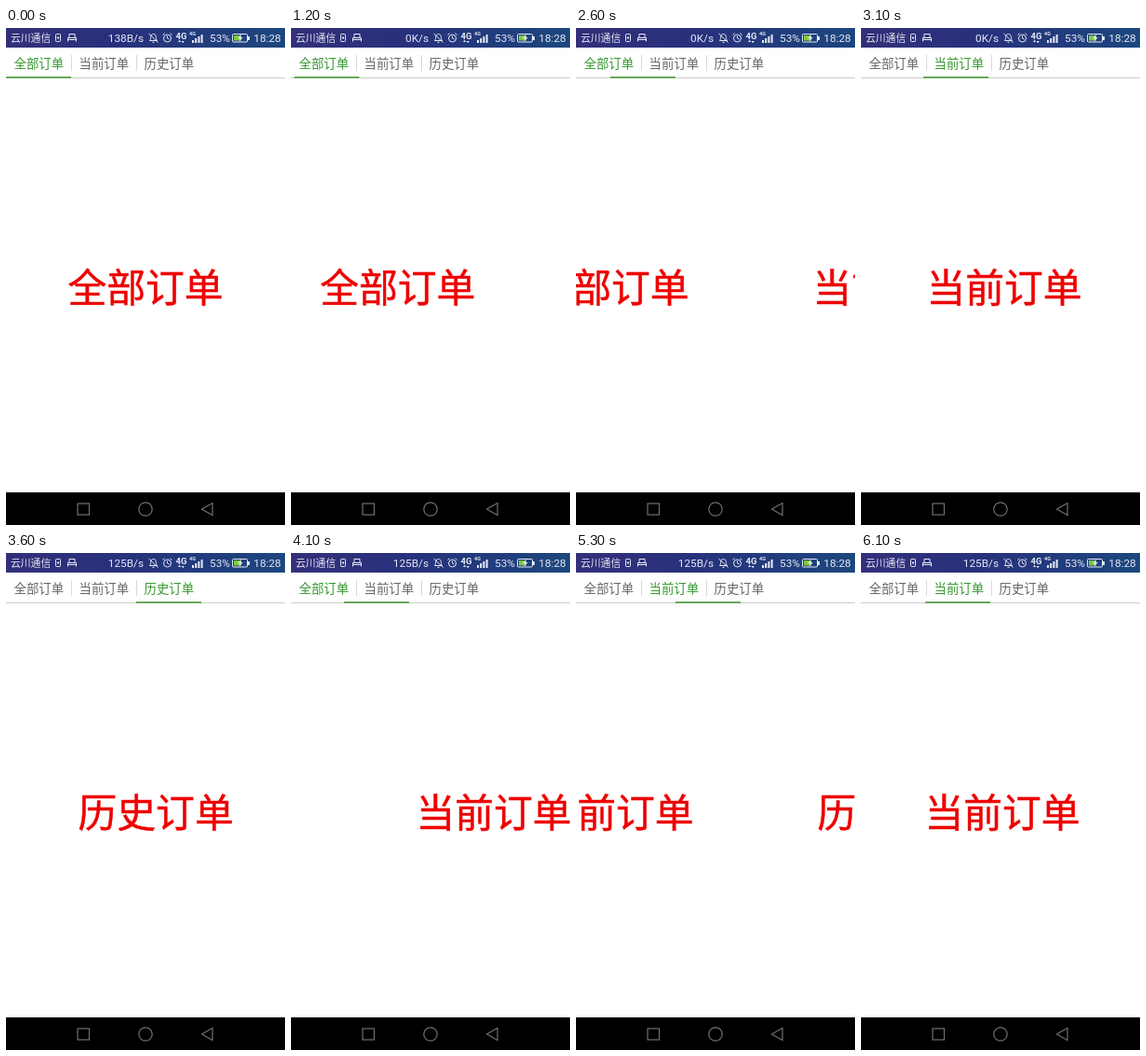
An HTML page for the animation above (6200 ms loop, 300x533 px).

```html
<!DOCTYPE html>
<html lang="zh-CN">
<head>
<meta charset="utf-8">
<title>订单</title>
<style>
  html, body { margin: 0; width: 100%; height: 100%; overflow: hidden; background: #fff; }
  svg { display: block; width: 100%; height: 100%; }
  text { font-family: "Noto Sans CJK SC", "Noto Sans CJK", sans-serif; }
  .status { fill: #e6e8f2; font-size: 11.8px; }
  .status text { font-family: Roboto, sans-serif; }
  .status .carrier { font: 10.8px "Noto Sans CJK SC", "Noto Sans CJK", sans-serif; }
  .status .net { font-size: 9.5px; font-weight: 700; }
  .status .net2 { font-size: 5.5px; font-weight: 700; }
  .line { fill: none; stroke: #e6e8f2; stroke-width: 1; }
  .tabs text { font-size: 13.4px; fill: #666; text-anchor: middle; }
  .tabs .on { fill: #35982f; }
  .pages text { font-size: 41.8px; fill: #ee0000; stroke: #ee0000; stroke-width: .5; text-anchor: middle; }
  .nav { fill: none; stroke: #707070; stroke-width: 1.2; }
</style>
</head>
<body>
<svg viewBox="0 0 300 533" preserveAspectRatio="none">
  <defs>
    <linearGradient id="bar">
      <stop offset="0" stop-color="#33307a"/>
      <stop offset=".4" stop-color="#28307c"/>
      <stop offset="1" stop-color="#1c477e"/>
    </linearGradient>
  </defs>
  <rect width="300" height="533" fill="#fff"/>

  <g class="pages" id="pages">
    <text x="150" y="294">全部订单</text>
    <text x="450" y="294">当前订单</text>
    <text x="750" y="294">历史订单</text>
  </g>

  <g class="tabs" id="tabs">
    <text x="35.3" y="43">全部订单</text>
    <text x="105.3" y="43">当前订单</text>
    <text x="175.3" y="43">历史订单</text>
  </g>
  <path d="M70.5 29V46M140.5 29V46" stroke="#d8d8d8"/>
  <path d="M0 53.5H300" stroke="#ccc"/>
  <rect id="mark" y="52" width="70" height="2" fill="#68a858"/>

  <rect width="300" height="21" fill="url(#bar)"/>
  <g class="status">
    <text class="carrier" x="5" y="15">云川通信</text>
    <rect class="line" x="53.5" y="6.5" width="5" height="8" rx=".8"/>
    <path d="M55 9.5h2v2h-2z"/>
    <path class="line" d="M68 10V6.5h6V10M66.5 14.5v-4h9v4M66.5 12.5h9"/>
    <text id="speed" x="148" y="15" text-anchor="end"></text>
    <path class="line" d="M154.5 13.5c2-2 0-7 4-7s2 5 4 7zM157.5 15.3h2M153.5 6l10 9.5"/>
    <circle class="line" cx="173.5" cy="11" r="4"/>
    <path class="line" d="M173.5 8.5V11l2 1M168.5 7.5l2-2M178.5 7.5l-2-2"/>
    <text class="net" x="182.5" y="11.5">4G</text>
    <path d="M185 15l1.6-2.2L188.2 15zM188.6 14l1.6 2.2L191.8 14z"/>
    <text class="net2" x="197" y="8">4G</text>
    <path d="M200 13h2v3h-2zM203.2 11h2v5h-2zM206.4 9h2v7h-2zM209.6 7h2v9h-2z"/>
    <text x="219" y="15">53%</text>
    <rect class="line" x="243.5" y="6.5" width="16" height="8.5" rx="1"/>
    <path d="M260 9h2v4h-2z"/>
    <path d="M245 8h8v5.5h-8z" fill="#7cc83c"/>
    <path d="M253 6.8l-4 4.4h2.6l-1.2 3.5 4.4-4.8h-2.6z"/>
    <text x="266.3" y="15">18:28</text>
  </g>

  <rect y="498" width="300" height="35" fill="#000"/>
  <g class="nav">
    <rect x="77" y="510" width="12.5" height="12"/>
    <circle cx="150" cy="516" r="7.2"/>
    <path d="M210.5 516L222 509.5V522.5Z"/>
  </g>
</svg>
<script>
const LOOP = 6200, STEP = 100, PAGE = 300, TAB = 70, LAG = 30;

// Swipe path: [time in ms, scroll in px]
const path = [
  [0, 0], [1120, 0], [1350, 170], [1560, 300], [1660, 345], [1700, 346], [1980, 600], [2060, 600],
  [2300, 315], [2430, 298], [2570, 158], [2600, 112], [2720, 0], [2790, 0], [3000, 240], [3070, 287],
  [3100, 296], [3180, 310], [3450, 600], [3570, 600], [3820, 310], [3980, 298], [4070, 244], [4100, 232],
  [4300, 0], [4360, 0], [4600, 285], [4700, 304], [4980, 600], [5060, 600], [5270, 458], [5300, 407],
  [5430, 310], [5500, 290], [5720, 0], [5800, 0], [6000, 270], [6070, 296], [6100, 298], [6200, 300]
];

const $ = id => document.getElementById(id);
const pages = $('pages'), mark = $('mark'), speed = $('speed');
const tabs = [...$('tabs').children];

const slope = i => (path[i + 1][1] - path[i][1]) / (path[i + 1][0] - path[i][0]);

// Tangent that never overshoots: flat at turning points
function tangent(i) {
  if (i === 0 || i === path.length - 1) return 0;
  const a = slope(i - 1), b = slope(i);
  return a * b <= 0 ? 0 : 2 * a * b / (a + b);
}

function scrollAt(t) {
  if (t <= 0) return 0;
  let i = 0;
  while (i < path.length - 2 && path[i + 1][0] <= t) i++;
  const [t0, p0] = path[i], [t1, p1] = path[i + 1];
  const h = t1 - t0, u = (t - t0) / h, v = 1 - u;
  return p0 * v * v * (1 + 2 * u) + p1 * u * u * (3 - 2 * u)
    + h * u * v * (v * tangent(i) - u * tangent(i + 1));
}

function draw() {
  const t = Math.floor(performance.now() % LOOP / STEP) * STEP;
  const pos = scrollAt(t), late = scrollAt(t - LAG);
  const page = pos / PAGE;
  // The tab switches to the page being swiped to soon after the swipe starts
  const current = pos < late ? Math.ceil(page - 0.8) : Math.floor(page + 0.7);

  pages.setAttribute('transform', `translate(${-pos.toFixed(1)} 0)`);
  mark.setAttribute('x', (late / PAGE * TAB).toFixed(1));
  tabs.forEach((tab, i) => tab.classList.toggle('on', i === current));
  speed.textContent = t < 600 ? '138B/s' : t < 3600 ? '0K/s' : '125B/s';
  requestAnimationFrame(draw);
}
draw();
</script>
</body>
</html>
```
